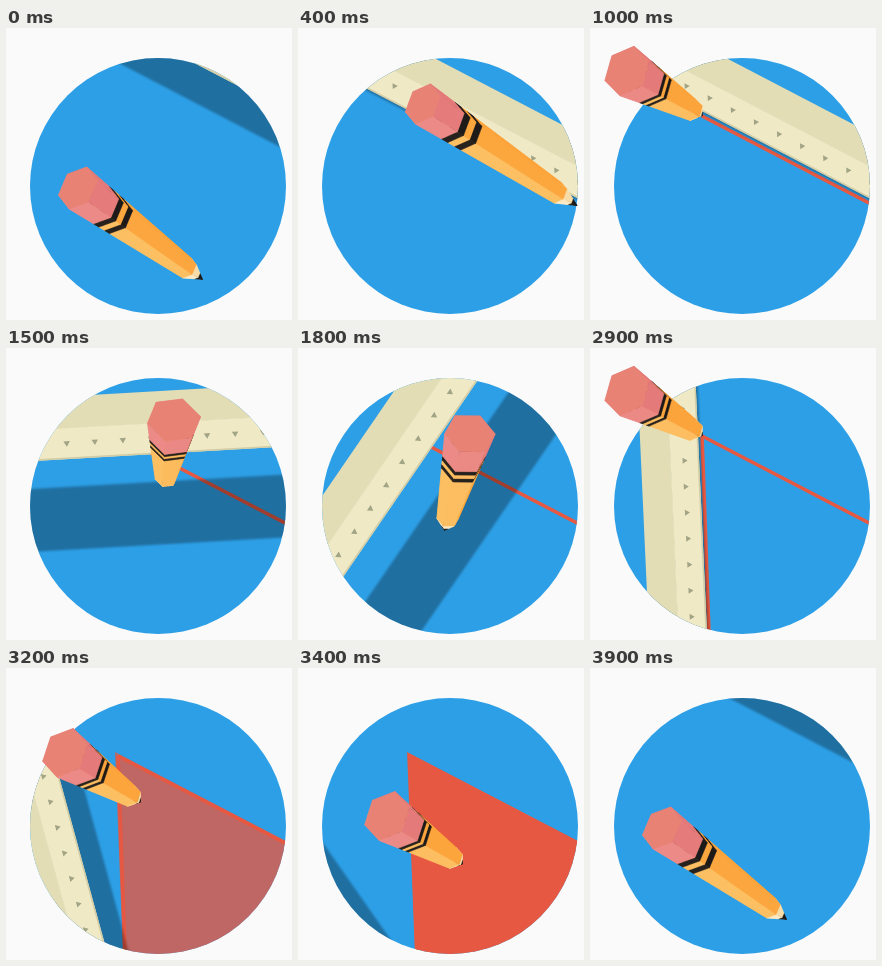
Write an HTML page that moves like this. It is 286 px wide and 292 px high and loops after 4000 ms.

```html
<!DOCTYPE html>
<html lang="en">
<head>
<meta charset="utf-8">
<title>Pencil and ruler</title>
<style>
html, body { margin: 0; width: 100%; height: 100%; overflow: hidden; background: #fafafa; }
svg { display: block; width: 286px; height: 292px; }
</style>
</head>
<body>
<svg viewBox="0 0 286 292">
  <defs>
    <clipPath id="disc"><circle cx="152" cy="158" r="128"/></clipPath>
    <filter id="soft"><feGaussianBlur stdDeviation="1.2"/></filter>
  </defs>
  <circle cx="152" cy="158" r="128" fill="#2d9fe6"/>
  <g clip-path="url(#disc)">
    <g id="ink" stroke="#e65841" stroke-width="3.6" fill="none">
      <path id="fill" fill="#e65841" d="M111 87L360 216.7V420H124Z"/>
      <path id="line1"/>
      <path id="line2"/>
    </g>
    <path id="shadow" fill-opacity=".3" filter="url(#soft)" d="M-340-58H340V0H-340Z"/>
    <g id="ruler">
      <path fill="#e3ddb6" d="M-340-58H340V-28H-340Z"/>
      <path fill="#f0e9c5" d="M-340-28.5H340V0H-340Z"/>
      <path fill="#d3cda6" d="M-340-1.5H340V0H-340Z"/>
      <path id="marks" fill="#a2a486"/>
    </g>
  </g>
  <g id="pencil" stroke-width=".5" stroke-linejoin="round"></g>
</svg>
<script>
const LOOP = 4000;
const el = id => document.getElementById(id);
const clamp = v => Math.max(0, Math.min(1, v));
const ramp = (t, a, b) => clamp((t - a) / (b - a));
const ease = x => x * x * (3 - 2 * x);
const mix = (a, b, f) => a + (b - a) * f;
const blend = (a, b, f) => a.map((v, i) => mix(v, b[i], f));

// Ruler poses: edge point x y, angle, height above the paper
const above = [228, -25, 27.5, 68];
const slanted = [158.7, 107.5, 27.5, 2];
const upright = [110.5, 138, -92.6, 2];
const gone = [-42, 320, -147, 83];

function rulerPose(t) {
  if (t >= 3600) t -= LOOP;
  if (t < 400) return blend(above, slanted, ease(ramp(t, -400, 400)));
  if (t > 2950) return blend(upright, gone, ease(ramp(t, 2950, 3750)));
  const x = ramp(t, 1170, 2170);
  const pose = blend(slanted, upright, ease(x));
  pose[3] += 400 * x * (1 - x);
  return pose;
}

let marks = '';
for (let n = -11; n <= 11; n++) marks += `M${n * 26 - 3}-16.5h6l-3 5z`;
el('marks').setAttribute('d', marks);

function drawRuler(t) {
  const [x, y, angle, lift] = rulerPose(t);
  const place = (id, shift) => el(id).setAttribute('transform',
    `translate(${x} ${y}) rotate(${angle}) translate(0 ${shift}) scale(${1 + lift * .0009})`);
  place('ruler', -lift * .1);
  place('shadow', lift * .9);
}

// Pencil poses: eraser centre and end of the painted body
const rest = [72, 160, 181, 240];
const right = [125, 76, 260, 165];
const corner = [37, 43, 103, 82];
const standing = [168, 72, 160, 130];
const aim = [178, 107, 134, 232];
const bottom = [166, 142, 125, 264];
const lifted = [33, 30, 99, 74];
const falling = [89, 148, 155, 190];
const moves = [
  [0, rest], [400, right], [500, right], [1000, corner], [1100, corner], [1500, standing],
  [2200, aim], [2400, bottom], [2870, corner], [2900, corner], [3020, lifted],
  [3400, falling], [3800, rest], [LOOP, rest]
];

function pencilPose(t) {
  const i = moves.findIndex(m => m[0] > t);
  const [t0, a] = moves[i - 1], [t1, b] = moves[i];
  return blend(a, b, ease(ramp(t, t0, t1)));
}

const pink = [[228, 121, 121], [235, 138, 134]];
const black = [[28, 25, 24], [40, 34, 30]];
const yellow = [[252, 163, 58], [252, 191, 98]];
const wood = [[246, 218, 164], [253, 234, 196]];
const shade = (range, f) => `rgb(${blend(...range, f).map(Math.round)})`;

const parts = Array.from({ length: 43 }, () =>
  el('pencil').appendChild(document.createElementNS('http://www.w3.org/2000/svg', 'polygon')));

function paint(node, pts, color) {
  node.setAttribute('points', pts.map(p => p.map(v => v.toFixed(2))).join(' '));
  node.setAttribute('fill', color);
  node.setAttribute('stroke', color);
}

// Draws a tapered hexagonal prism from its far end forward; returns the tip.
// The more it is foreshortened, the larger its near end looks.
function drawPencil(t) {
  const [fx, fy, tx, ty] = pencilPose(t);
  const len = Math.hypot(tx - fx, ty - fy), ux = (tx - fx) / len, uy = (ty - fy) / len;
  const near = 30 - len * .05, far = 11, squash = .9 - len * .0012;
  const eraser = .36 - len * .00107, band = .047, point = len * .14;
  const twist = Math.PI / 15, step = Math.PI / 3;
  const dir = a => {
    const c = Math.cos(a) * squash, s = Math.sin(a);
    return [c * ux - s * uy, c * uy + s * ux];
  };
  const ring = (d, r) => Array.from({ length: 6 }, (_, i) => {
    const v = dir(twist + i * step);
    return [fx + ux * d + v[0] * r, fy + uy * d + v[1] * r];
  });
  const body = p => ring(p * len, mix(near, far, p));
  const cone = q => ring(len + point * q, far * (1 - q));
  const rings = [cone(1), cone(.6), body(1), ...[3, 2, 1, 0].map(n => body(eraser + n * band)), body(0)];
  const colors = [black, wood, yellow, black, yellow, black, pink];
  const mid = i => twist + (i + .5) * step;
  const order = [0, 1, 2, 3, 4, 5].sort((a, b) => Math.cos(mid(a)) - Math.cos(mid(b)));
  let n = 0;
  colors.forEach((color, s) => order.forEach(i => {
    const j = (i + 1) % 6, back = rings[s], front = rings[s + 1], v = dir(mid(i));
    paint(parts[n++], [front[i], front[j], back[j], back[i]],
      shade(color, clamp(.5 + .65 * (v[1] - v[0]))));
  }));
  paint(parts[n], rings[7], '#e88275');
  return [tx + ux * point, ty + uy * point];
}

function drawInk(t, [x, y]) {
  const p1 = t < 500 ? 0 : t < 1000 ? ramp(x, 280, 112) : 1;
  const p2 = t < 2400 ? 0 : t < 2880 ? ramp(y, 283, 88) : 1;
  const line = (id, x0, y0, p) => {
    el(id).setAttribute('d', `M${x0} ${y0}L${mix(x0, 112, p)} ${mix(y0, 88, p)}`);
    el(id).style.display = p > 0 ? '' : 'none';
  };
  line('line1', 282, 176.5, p1);
  line('line2', 119, 285, p2);
  el('fill').setAttribute('opacity', ramp(t, 3020, 3250));
  el('ink').setAttribute('opacity', 1 - ramp(t, 3520, 3850));
}

function render(t) {
  drawRuler(t);
  drawInk(t, drawPencil(t));
}

const start = performance.now();
function tick(now) {
  render(Math.max(0, now - start) % LOOP);
  requestAnimationFrame(tick);
}
render(0);
requestAnimationFrame(tick);
</script>
</body>
</html>
```
